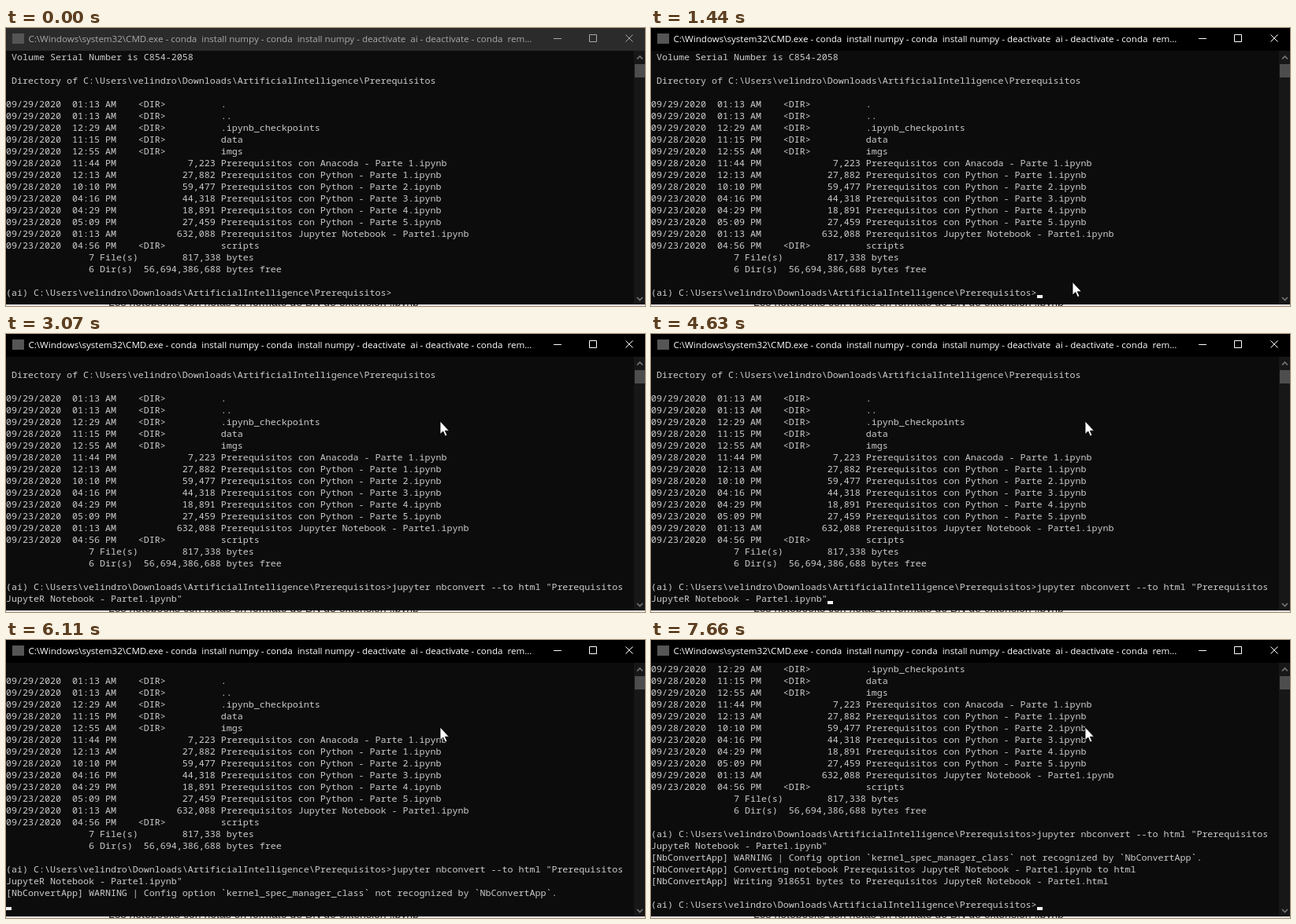
Animation of 811 by 354 pixels, one loop 8 s. Source, as an HTML page:

```html
<!DOCTYPE html>
<html lang="es">
<head>
<meta charset="utf-8">
<style>
  html, body { margin: 0; width: 100%; height: 100%; overflow: hidden; background: #0c0c0c; }
  #page, #bar, #title, #screen, svg, #caret { position: absolute; left: 0; top: 0; }
  #page { top: 352px; width: 811px; height: 2px; overflow: hidden; background: #e4e0e0; }
  #page span { position: absolute; left: 130px; bottom: -3px; white-space: pre; color: #222;
    font: 14px/16px "Liberation Sans", sans-serif; }
  #bar { width: 811px; height: 29px; }
  #title { left: 28.5px; white-space: pre; font: 11.57px/28px "Open Sans", sans-serif; }
  #screen { top: 29px; margin: 0; color: #ccc; font: 11.667px/15px "Noto Sans Mono", monospace; }
  #caret { top: 340px; width: 7px; height: 4px; background: #f2f2f2; }
</style>
</head>
<body>
<div id="page"><span>Los notebooks con notas en formato de BN de extensión .ipynb</span></div>
<div id="bar"><span id="title">C:\Windows\system32\CMD.exe - conda  install numpy - conda  install numpy - deactivate  ai - deactivate - conda  rem...</span></div>
<pre id="screen"></pre>
<div id="caret"></div>
<svg width="811" height="354" fill="none">
  <rect x="8" y="7" width="15" height="13" fill="#555"/>
  <path id="buttons" stroke="currentColor" d="M695 13.5h10M740.5 8.5h9v9h-9zM786.5 8.5l9 9m0-9l-9 9"/>
  <path fill="#171717" d="M797 29h14v323h-14z"/>
  <path fill="#4d4d4d" d="M798 46h13v17h-13z"/>
  <path stroke="#777" stroke-width="1.6" d="M801 39.5l3.5-3.5 3.5 3.5M801 343l3.5 3.5 3.5-3.5"/>
  <path id="mouse" fill="#fff" stroke="#000" stroke-width=".8" d="M0 0V16.5L3.8 13L6.4 19L8.9 18L6.3 12.2H11.4Z"/>
</svg>
<script>
const $ = id => document.getElementById(id);
const LOOP = 8000, ROWS = 21, COLS = 113;
const prompt = '(ai) C:\\Users\\velindro\\Downloads\\ArtificialIntelligence\\Prerequisitos>';
const command = 'jupyter nbconvert --to html "Prerequisitos JupyteR Notebook - Parte1.ipynb"';

const entry = (day, time, name, size) =>
  `09/${day}/2020  ${time}` + (size ? size.padStart(18) : '    <DIR>'.padEnd(18)) + ' ' + name;
const part = n => `Prerequisitos con Python - Parte ${n}.ipynb`;

const listing = [
  ' Volume Serial Number is C854-2058',
  '',
  ' Directory of C:\\Users\\velindro\\Downloads\\ArtificialIntelligence\\Prerequisitos',
  '',
  entry(29, '01:13 AM', '.'),
  entry(29, '01:13 AM', '..'),
  entry(29, '12:29 AM', '.ipynb_checkpoints'),
  entry(28, '11:15 PM', 'data'),
  entry(29, '12:55 AM', 'imgs'),
  entry(28, '11:44 PM', 'Prerequisitos con Anacoda - Parte 1.ipynb', '7,223'),
  entry(29, '12:13 AM', part(1), '27,882'),
  entry(28, '10:10 PM', part(2), '59,477'),
  entry(23, '04:16 PM', part(3), '44,318'),
  entry(23, '04:29 PM', part(4), '18,891'),
  entry(23, '05:09 PM', part(5), '27,459'),
  entry(29, '01:13 AM', 'Prerequisitos Jupyter Notebook - Parte1.ipynb', '632,088'),
  entry(23, '04:56 PM', 'scripts'),
  '7 File(s)        817,338 bytes'.padStart(45),
  '6 Dir(s)  56,694,386,688 bytes free'.padStart(50),
  ''
];

// [time, text written to the console]
const output = [
  [0, prompt],
  [1920, command.slice(0, 20)],
  [1990, command.slice(20, 43)],
  [2070, command.slice(43)],
  [4930, '\n'],
  [6110, '[NbConvertApp] WARNING | Config option `kernel_spec_manager_class` not recognized by `NbConvertApp`.\n'],
  [6180, '[NbConvertApp] Converting notebook Prerequisitos JupyteR Notebook - Parte1.ipynb to html\n'],
  [7430, '[NbConvertApp] Writing 918651 bytes to Prerequisitos JupyteR Notebook - Parte1.html\n'],
  [7660, '\n' + prompt]
];
const blinks = [1440, 1990, 2540, 3070, 3530, 4080, 4630, 5180, 5710, 6730, 7280];

// [time, x, y] of the pointer tip
const path = [
  [210, 688, 349], [450, 605, 338], [680, 535, 323.5], [2380, 535, 323.5],
  [2610, 560, 235], [2840, 567, 140], [2990, 553, 108], [3070, 551, 111]
];
const STEP = 77;

function pointer(t) {
  const next = path.findIndex(p => p[0] > t);
  if (next < 0) return path[path.length - 1].slice(1);
  if (!next) return [-50, -50];
  const a = path[next - 1], b = path[next];
  const steps = Math.floor((t - a[0]) / STEP) * STEP;
  const k = steps / (b[0] - a[0]);
  return [1, 2].map(i => a[i] + (b[i] - a[i]) * k);
}

function consoleLines(t) {
  const text = output.filter(o => o[0] <= t).map(o => o[1]).join('');
  const lines = text.split('\n').flatMap(line =>
    line.length > COLS ? [line.slice(0, COLS), line.slice(COLS)] : [line]);
  return [...listing, ...lines].slice(-ROWS);
}

let shown = '';
function draw(now) {
  const t = now % LOOP;
  const [back, ink] = t < 980 ? ['#2b2b2b', '#aaa'] : t < 1060 ? ['#161616', '#d4d4d4'] : ['#000', '#fff'];
  $('bar').style.background = back;
  $('bar').style.color = $('buttons').style.color = ink;

  const lines = consoleLines(t), text = lines.join('\n');
  if (text !== shown) $('screen').textContent = shown = text;

  $('caret').style.left = lines[ROWS - 1].length * 7 + 'px';
  $('caret').hidden = blinks.filter(b => b <= t).length % 2 === 0;
  $('mouse').setAttribute('transform', `translate(${pointer(t)})`);
}

const start = performance.now();
function tick() {
  draw(performance.now() - start);
  requestAnimationFrame(tick);
}
tick();
</script>
</body>
</html>
```
